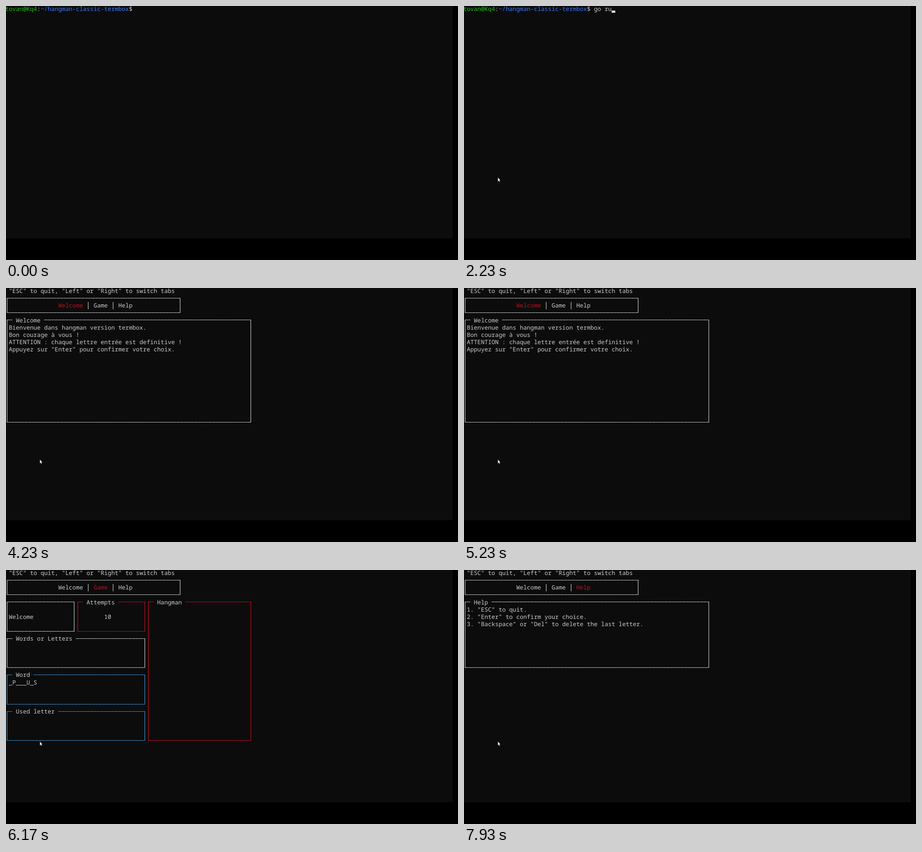
Recreate the animation shown at these times as an HTML page. Size 998 by 561 pixels, loop 8 s.

```html
<!DOCTYPE html>
<html lang="en">
<head>
<meta charset="utf-8">
<title>Hangman in the terminal</title>
<style>
  html, body { margin: 0; width: 100%; height: 100%; overflow: hidden; background: #000; }
  svg { display: block; width: 998px; height: 561px; }
  text {
    font: 13px "Noto Sans Mono", monospace;
    white-space: pre;
    text-rendering: geometricPrecision;
  }
</style>
</head>
<body>
<svg id="stage" viewBox="0 0 998 561"></svg>
<script>
const LOOP = 8000, CELL = 7.8, ROW = 16.09, LEFT = -1.6;
const COLORS = { fg: '#cccccc', green: '#16c60c', blue: '#3b78ff', red: '#c50f1f', sky: '#3a96dd' };

const stage = document.getElementById('stage');
const colX = col => LEFT + col * CELL;
const snap = v => Math.round(v - 0.5) + 0.5;
const lineX = col => snap(colX(col + 0.5));
const lineY = row => snap(6.4 + row * ROW);

function add(parent, tag, attrs = {}, text) {
  const el = document.createElementNS('http://www.w3.org/2000/svg', tag);
  for (const key in attrs) el.setAttribute(key, attrs[key]);
  if (text !== undefined) el.textContent = text;
  parent.append(el);
  return el;
}

function write(parent, col, row, text, color = COLORS.fg) {
  return add(parent, 'text', { x: colX(col), y: 11.2 + row * ROW, fill: color }, text);
}

// Box given in terminal cells; the title interrupts the top edge.
function box(parent, c0, r0, c1, r1, title = '', color = COLORS.fg) {
  const [x0, x1, y0, y1] = [lineX(c0), lineX(c1), lineY(r0), lineY(r1)];
  const top = title
    ? `M${x0} ${y0}H${colX(c0 + 2)}M${colX(c0 + 4 + title.length)} ${y0}H${x1}`
    : `M${x0} ${y0}H${x1}`;
  const rows = `${top}M${x0} ${y1}H${x1}`;
  const paint = { fill: 'none', stroke: color, 'stroke-width': 1.2 };
  add(parent, 'path', { ...paint, d: `M${x0} ${y0}V${y1}M${x1} ${y0}V${y1}`, 'stroke-linecap': 'square' });
  add(parent, 'path', { ...paint, d: rows, 'stroke-opacity': 0.6 });
  add(parent, 'path', { ...paint, d: rows, 'stroke-dasharray': '6.8 1' });
  if (title) write(parent, c0 + 3, r0, title);
}

function screen(activeTab) {
  const g = add(stage, 'g', { visibility: 'hidden' });
  write(g, 1, 0, '"ESC" to quit, "Left" or "Right" to switch tabs');
  box(g, 0, 1, 49, 3);
  [['Welcome', 15], ['Game', 25], ['Help', 32]].forEach(([name, col]) =>
    write(g, col, 2, name, name === activeTab ? COLORS.red : COLORS.fg));
  for (const col of [23, 30])
    add(g, 'path', { d: `M${lineX(col)} 31V47`, stroke: COLORS.fg, 'stroke-width': 1.2 });
  return g;
}

function page(name, bottom, lines) {
  const g = screen(name);
  box(g, 0, 4, 69, bottom, name);
  lines.forEach((line, i) => write(g, 1, 5 + i, line));
  return g;
}

function gamePage() {
  const g = screen('Game');
  box(g, 0, 4, 19, 8);
  box(g, 20, 4, 39, 8, 'Attempts', COLORS.red);
  box(g, 40, 4, 69, 23, 'Hangman', COLORS.red);
  box(g, 0, 9, 39, 13, 'Words or Letters');
  box(g, 0, 14, 39, 18, 'Word', COLORS.sky);
  box(g, 0, 19, 39, 23, 'Used letter', COLORS.sky);
  write(g, 1, 6, 'Welcome');
  write(g, 28, 6, '10');
  write(g, 1, 15, '_P___U_S');
  return g;
}

add(stage, 'rect', { width: 986, height: 513, fill: '#0c0c0c' });

const shell = add(stage, 'g');
write(shell, 0, 0, 'tovan@Kq4', COLORS.green);
write(shell, 9, 0, ':');
write(shell, 10, 0, '~/hangman-classic-termbox', COLORS.blue);
write(shell, 35, 0, '$');
const command = write(shell, 37, 0, '');
const caret = add(shell, 'rect', { width: 8, height: 4.5, fill: '#f2f2f2' });

const scenes = [
  [0, shell],
  [4170, page('Welcome', 18, [
    'Bienvenue dans hangman version termbox.',
    'Bon courage à vous !',
    'ATTENTION : chaque lettre entrée est definitive !',
    'Appuyez sur "Enter" pour confirmer votre choix.'
  ])],
  [6050, gamePage()],
  [7400, page('Help', 13, [
    '1. "ESC" to quit.',
    '2. "Enter" to confirm your choice.',
    '3. "Backspace" or "Del" to delete the last letter.'
  ])]
];

// Time of each key and the number of command characters shown after it.
const COMMAND = 'go run main.go ';
const ENTER = 3830;
const keys = [
  [950, 0], [1760, 1], [1860, 2], [1960, 3], [2060, 4], [2160, 5], [2290, 6],
  [2640, 7], [3050, 8], [3210, 9], [3450, 15], [ENTER, 15]
];

const pointer = add(stage, 'path', {
  d: 'M0 0V9.2L2 7.4L3.4 10.4L4.9 9.7L3.6 6.8H6Z',
  fill: '#fff', stroke: '#000', 'stroke-width': 0.6
});

const latest = (table, t) => table.filter(([start]) => start <= t).pop();

function movePointer(t) {
  const p = Math.min(1, Math.max(0, (t - 420) / 500));
  const ease = 1 - (1 - p) ** 3;
  pointer.setAttribute('transform', `translate(${-6 + 80.7 * ease} ${500 - 121.5 * ease})`);
}

function draw(t) {
  const active = latest(scenes, t)[1];
  for (const [, group] of scenes)
    group.setAttribute('visibility', group === active ? 'visible' : 'hidden');

  const key = latest(keys, t);
  const typed = key ? key[1] : 0;
  const entered = t >= ENTER;
  command.textContent = COMMAND.slice(0, typed);
  caret.setAttribute('x', entered ? colX(0) : colX(37 + typed));
  caret.setAttribute('y', entered ? 10.2 + ROW : 10.2);
  caret.setAttribute('opacity', key && (t - key[0]) % 1060 < 530 ? 1 : 0);

  movePointer(t);
}

const begin = performance.now();
function tick() {
  draw((performance.now() - begin) % LOOP);
  requestAnimationFrame(tick);
}
tick();
</script>
</body>
</html>
```
